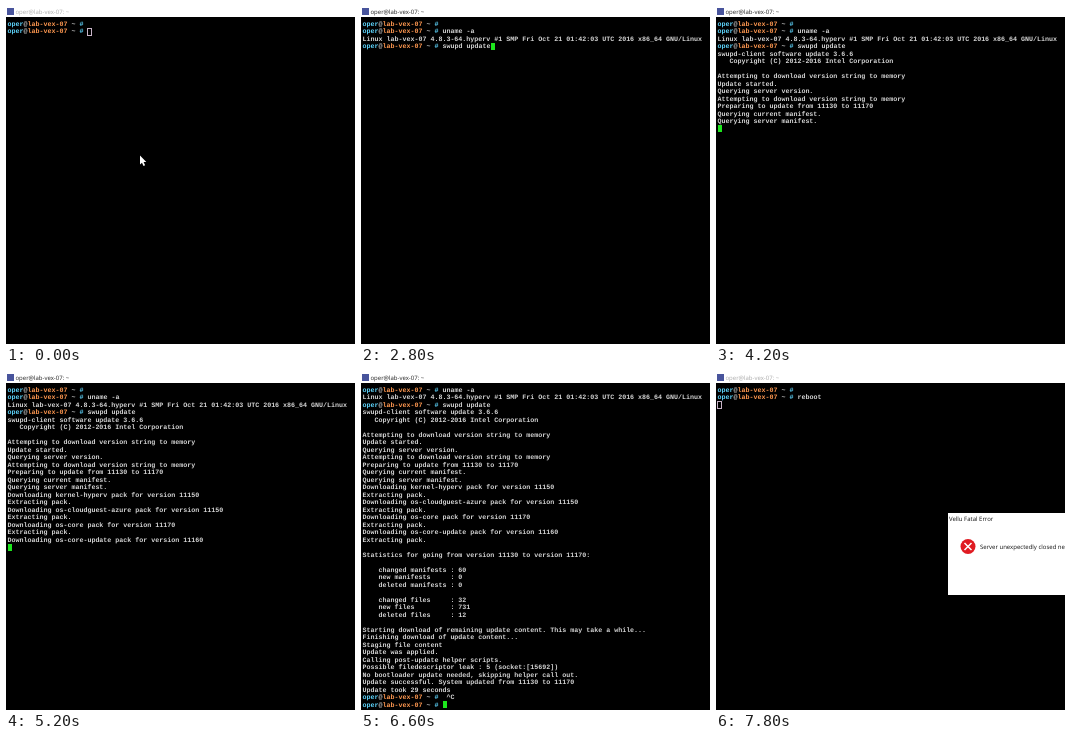
An HTML page with a canvas that plays this animation: 349 px wide and 338 px high, repeating every 8000 ms.

```html
<!DOCTYPE html>
<html lang="en">
<head>
<meta charset="utf-8">
<title>Terminal update</title>
<style>
  html, body { margin: 0; width: 100%; height: 100%; overflow: hidden; background: #000; }
  canvas { display: block; }
</style>
</head>
<body>
<canvas id="stage" width="349" height="338"></canvas>
<script>
const ctx = document.getElementById('stage').getContext('2d');
const LOOP = 8000, STEP = 200;
const CHAR = 4, ROW = 7.5, LEFT = 1.5, TOP = 14.2, ROWS = 43;
const MONO = 'bold 6.667px "Liberation Mono", monospace';
const UI = '6px "Open Sans", sans-serif';
const USER = 'oper', HOST = 'lab-vex-07';
const PROMPT_LENGTH = 20;

// Lines starting with "$" are shell prompts followed by their input.
const session = `$
$uname -a
Linux ${HOST} 4.8.3-64.hyperv #1 SMP Fri Oct 21 01:42:03 UTC 2016 x86_64 GNU/Linux
$swupd update
swupd-client software update 3.6.6
   Copyright (C) 2012-2016 Intel Corporation

Attempting to download version string to memory
Update started.
Querying server version.
Attempting to download version string to memory
Preparing to update from 11130 to 11170
Querying current manifest.
Querying server manifest.
Downloading kernel-hyperv pack for version 11150
Extracting pack.
Downloading os-cloudguest-azure pack for version 11150
Extracting pack.
Downloading os-core pack for version 11170
Extracting pack.
Downloading os-core-update pack for version 11160
Extracting pack.

Statistics for going from version 11130 to version 11170:

    changed manifests : 60
    new manifests     : 0
    deleted manifests : 0

    changed files     : 32
    new files         : 731
    deleted files     : 12

Starting download of remaining update content. This may take a while...
Finishing download of update content...
Staging file content
Update was applied.
Calling post-update helper scripts.
Possible filedescriptor leak : 5 (socket:[15692])
No bootloader update needed, skipping helper call out.
Update successful. System updated from 11130 to 11170
Update took 29 seconds
$ ^C`.split('\n');

// [time in ms, finished lines]
const progress = [
  [0, 1], [1400, 3], [3200, 7], [3400, 8], [3600, 10], [3800, 12], [4000, 13],
  [4200, 14], [4400, 15], [4600, 16], [4800, 18], [5000, 19], [5200, 21],
  [5400, 22], [5600, 33], [5800, 35], [6000, 38], [6200, 40], [6400, 42], [6600, 43]
];

function typed(text, time, start, end) {
  const part = Math.min(1, Math.max(0, (time - start) / (end - start)));
  return text.slice(0, Math.round(text.length * part));
}

function screenAt(time) {
  if (time >= 7800) return ['$', '$reboot', ''];
  if (time >= 7400) return ['$', '$' + typed('reboot', time, 7200, 7600)];
  if (time >= 7200) return ['$'];
  const count = progress.filter(([start]) => start <= time).pop()[1];
  let input = '';
  if (time < 1400) input = '$' + typed('uname -a', time, 200, 1200);
  else if (time < 3200) input = '$' + typed('swupd update', time, 1800, 2800);
  else if (time >= 6600) input = '$' + typed('clear', time, 6800, 7000);
  return [...session.slice(0, count), input].slice(-ROWS);
}

function write(text, x, y, color, font) {
  ctx.font = font;
  ctx.fillStyle = color;
  ctx.fillText(text, x, y);
}

function drawLine(line, row) {
  const y = TOP + row * ROW + 5.6;
  const put = (text, column, color) => write(text, LEFT + column * CHAR, y, color, MONO);
  if (line[0] !== '$') return put(line, 0, '#d4d4d4');
  put(USER, 0, '#5fd7ff');
  put('@', 4, '#c4c4c4');
  put(HOST, 5, '#ff9850');
  put('~', 16, '#c4c4c4');
  put('#', 18, '#5fd7ff');
  put(line.slice(1), PROMPT_LENGTH, '#d4d4d4');
}

function drawCursor(lines, focused) {
  const row = lines.length - 1, line = lines[row];
  const column = line[0] === '$' ? PROMPT_LENGTH + line.length - 1 : line.length;
  const x = Math.round(LEFT + column * CHAR), y = Math.round(TOP + row * ROW);
  if (focused) {
    ctx.fillStyle = '#1de61d';
    ctx.fillRect(x, y, 4, 7);
  } else {
    ctx.strokeStyle = '#c8b4c8';
    ctx.lineWidth = 1;
    ctx.strokeRect(x - 0.5, y + 0.5, 4, 7);
  }
}

function drawTitleBar(focused) {
  ctx.fillStyle = '#fff';
  ctx.fillRect(0, 0, 349, 11);
  ctx.fillStyle = '#48549c';
  ctx.fillRect(1, 2, 7, 7);
  write(`${USER}@${HOST}: ~`, 9.5, 8, focused ? '#222' : '#aaa', UI);
}

function drawPointer() {
  ctx.fillStyle = '#fff';
  ctx.fill(new Path2D('M134 149.5v9l2-1.8 1.5 3.3 1.6-.7-1.5-3.2h2.7z'));
}

function drawDialog() {
  ctx.fillStyle = '#fff';
  ctx.fillRect(232, 141, 117, 82);
  write('Vellu Fatal Error', 233, 149, '#111', UI);
  ctx.fillStyle = '#e01b22';
  ctx.beginPath();
  ctx.arc(252, 174.5, 7.5, 0, 2 * Math.PI);
  ctx.fill();
  ctx.strokeStyle = '#fff';
  ctx.lineWidth = 1.5;
  ctx.stroke(new Path2D('M248.5 171l7 7m0-7l-7 7'));
  write('Server unexpectedly closed network connection', 264, 177, '#111', UI);
}

function draw(now) {
  const time = Math.floor((now % LOOP) / STEP) * STEP;
  const focused = time >= 200 && time < 7800;
  const lines = screenAt(time);
  ctx.textRendering = 'geometricPrecision';
  ctx.fillStyle = '#000';
  ctx.fillRect(0, 0, 349, 338);
  drawTitleBar(focused);
  lines.forEach(drawLine);
  drawCursor(lines, focused);
  if (time < 400) drawPointer();
  if (time >= 7800) drawDialog();
}

const start = performance.now();
function tick() {
  draw(performance.now() - start);
  requestAnimationFrame(tick);
}
tick();
</script>
</body>
</html>
```
